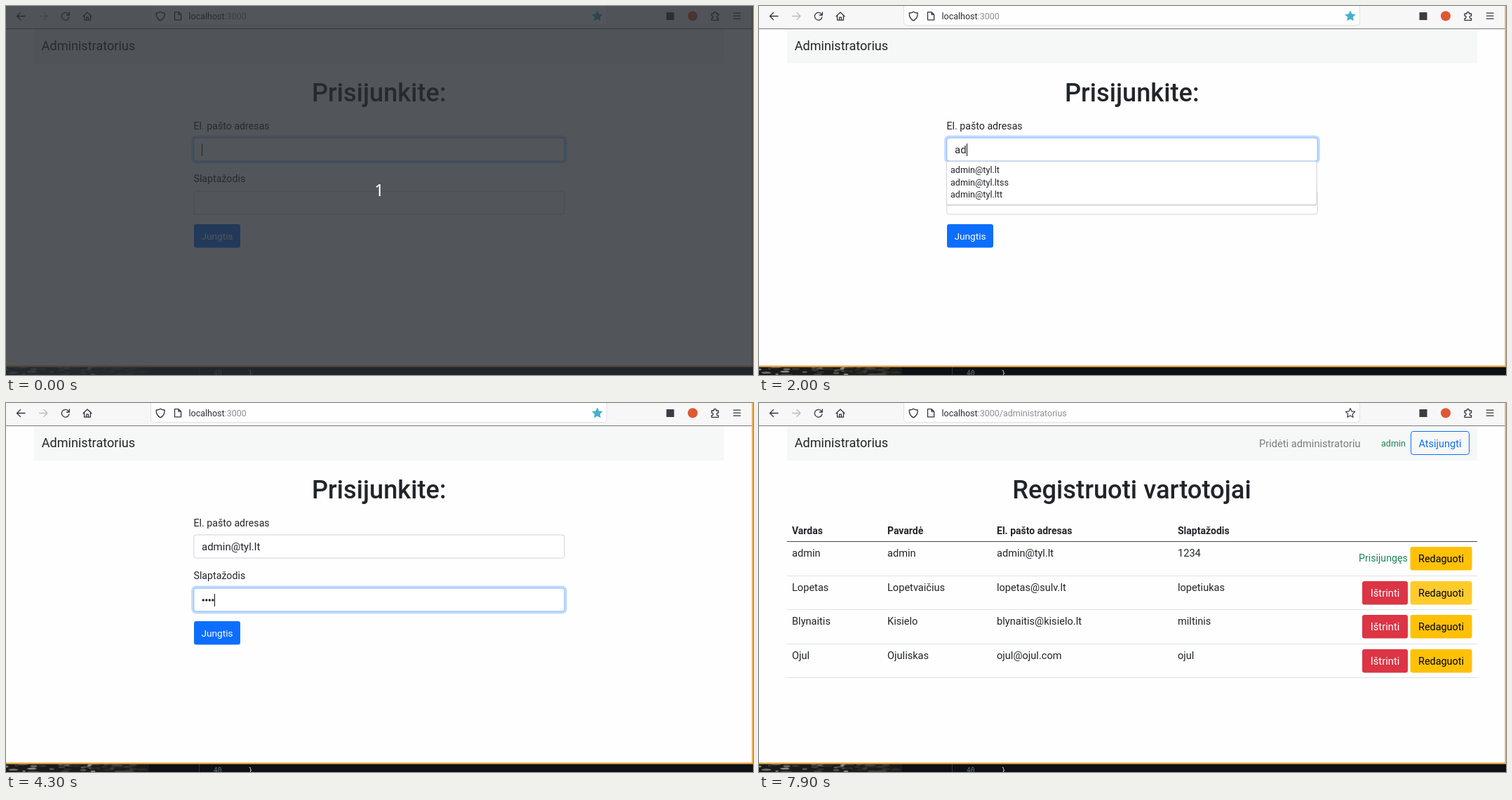
An HTML page that plays this animation: 1065 by 526 pixels, repeating every 8000 ms.

```html
<!DOCTYPE html>
<html lang="lt">
<head>
<meta charset="utf-8">
<title>Administratorius</title>
<style>
  html, body { margin: 0; width: 100%; height: 100%; overflow: hidden; background: #fefefe; }
  svg { display: block; width: 1065px; height: 526px; }
  text { font-family: Roboto, "Noto Sans", sans-serif; white-space: pre; }
  .mono { font-family: "DejaVu Sans Mono", monospace; }
  .icon { fill: none; stroke: #35343c; stroke-width: 1.3; stroke-linecap: round; stroke-linejoin: round; }
  .icon .dim { stroke: #bdbdc1; }
</style>
</head>
<body>
<svg id="stage" viewBox="0 0 1065 526" xmlns="http://www.w3.org/2000/svg"></svg>
<script>
const INK = '#212529', BLUE = '#0d6efd', GREEN = '#198754', YELLOW = '#ffc107';
const LOOP = 8000;
const mails = ['admin@tyl.lt', 'admin@tyl.ltss', 'admin@tyl.ltt',
  'lopetas@sulv.lt', 'blynaitis@kisielo.lt', 'ojul@ojul.com'];
const users = [
  ['admin', 'admin', mails[0], '1234'],
  ['Lopetas', 'Lopetvaičius', mails[3], 'lopetiukas'],
  ['Blynaitis', 'Kisielo', mails[4], 'miltinis'],
  ['Ojul', 'Ojuliskas', mails[5], 'ojul']
];
const columns = [47, 183, 339, 597];

const text = (x, y, s, size = 14.6, fill = INK, more = '') =>
  `<text x="${x}" y="${y}" font-size="${size}" fill="${fill}" ${more}>${s}</text>`;
const middle = (x, y, s, size, fill, more = '') =>
  text(x, y, s, size, fill, 'text-anchor="middle" ' + more);
const rect = (x, y, w, h, fill, more = '') =>
  `<rect x="${x}" y="${y}" width="${w}" height="${h}" fill="${fill}" ${more}/>`;
const path = (d, more = '') => `<path d="${d}" ${more}/>`;
const group = (id, body) => `<g id="${id}">${body}</g>`;
const button = (x, y, w, label, fill, color, size = 14.5, id = '') =>
  rect(x, y, w, 33.5, fill, `rx="3.3" ${id && `id="${id}"`}`) + middle(x + w / 2, y + 22, label, size, color);

function star(cx, cy, r) {
  const pts = [];
  for (let i = 0; i < 10; i++) {
    const a = Math.PI * (i / 5 - 0.5), d = i % 2 ? r * 0.48 : r;
    pts.push((cx + d * Math.cos(a)).toFixed(1) + ',' + (cy + d * Math.sin(a)).toFixed(1));
  }
  return `<polygon id="star" points="${pts.join(' ')}" stroke-width="1.2" stroke-linejoin="round"/>`;
}

function field(y, id) {
  return rect(267.8, y, 528.4, 33, '#fff', 'rx="3.3" stroke="#ced4da"') +
    group(id, rect(266, y - 1.8, 532, 36.6, 'none', 'rx="5" stroke="#c2dbfe" stroke-width="3.6"') +
      rect(267.8, y, 528.4, 33, '#fff', 'rx="3.3" stroke="#86b7fe"'));
}

function toolbar() {
  return rect(0, 0, 1065, 32, '#f7f7f7') + rect(0, 32, 1065, 1, '#7a7a7e') +
    rect(206.5, -4, 650, 31.5, '#fefefe', 'rx="4" stroke="#e2e2e4"') +
    '<g class="icon">' +
    path('M27 14.5H15.5M20.5 9.5L15.5 14.5L20.5 19.5') +
    path('M47.5 14.5H59M54 9.5L59 14.5L54 19.5', 'class="dim"') +
    group('reload', path('M89.2 11.7A5.4 5.4 0 1 0 90 15.8M90.4 9V13H86.4')) +
    group('stop', path('M80 10.5L89 19.5M89 10.5L80 19.5')) +
    path('M110 14.8L116 9L122 14.8M111.6 13.6V20.2H120.4V13.6M114.6 20V16.2H117.4V20') +
    path('M220.2 8.2C222 9.6 224 10 226.2 10C226.4 15.2 224.4 18.8 220.2 20.8C216 18.8 214 15.2 214.2 10C216.4 10 218.4 9.6 220.2 8.2Z') +
    path('M240.5 8.6H246L249.6 12.2V19.8H240.5ZM246 8.6V12.2H249.6') +
    path('M1006 11H1009V9.8A1.9 1.9 0 0 1 1012.6 9.8V11H1015.6V14.2H1014.4A1.8 1.8 0 0 0 1014.4 17.6H1015.6V20.4H1006V17.6H1007A1.8 1.8 0 0 0 1007 14.2H1006Z') +
    path('M1037.3 10.2H1047M1037.3 14.2H1047M1037.3 18.2H1047') + '</g>' +
    star(843, 14.6, 7) +
    rect(941.5, 9, 11, 11, '#3c3b43') +
    '<circle cx="979" cy="14.3" r="7" fill="#de5833"/>' +
    text(260.5, 18.6, 'localhost<tspan fill="#8d8d92">:3000<tspan id="route"></tspan></tspan>', 12.5, '#2b2a33');
}

function login() {
  return middle(531.7, 136, 'Prisijunkite:', 36.2, INK, 'font-weight="500"') +
    text(267.5, 175.5, 'El. pašto adresas', 14.2) + text(267.5, 251, 'Slaptažodis', 14.2) +
    field(188, 'mailRing') + field(264, 'passRing') +
    text(279, 210, '', 15, INK, 'id="mail"') +
    group('dots', [0, 1, 2, 3].map(i => `<circle cx="${281.2 + i * 4.55}" cy="281" r="1.75" fill="${INK}"/>`).join('')) +
    rect(0, 0, 1, 18, '#111', 'id="caret"') +
    button(268, 311, 66, 'Jungtis', BLUE, '#fff', 13.7, 'enter') +
    group('list',
      rect(267.5, 222.5, 528, 62, '#000', 'id="listShade" rx="3" opacity=".12"') +
      rect(267.5, 221.5, 527.5, 61, '#fff', 'id="listBox" rx="2" stroke="#d4d4d6"') +
      rect(269, 225, 525, 18, '#f0f0f0', 'id="pick"') +
      mails.map((m, i) => text(273, 238 + i * 17.7, m, 12.6, INK, 'class="row"')).join(''));
}

function admin() {
  const heads = ['Vardas', 'Pavardė', 'El. pašto adresas', 'Slaptažodis'];
  let out = text(713, 62.8, 'Pridėti administratoriu', 14.65, '#7a7c7c') +
    text(887, 62, 'admin', 12.6, GREEN) +
    rect(929.5, 40.5, 83, 33, 'none', `rx="3.3" stroke="${BLUE}"`) +
    middle(971, 62.8, 'Atsijungti', 14.5, BLUE) +
    middle(531.5, 136, 'Registruoti vartotojai', 36.3, INK, 'font-weight="500"') +
    heads.map((h, i) => text(columns[i], 187, h, 14, INK, 'font-weight="700"')).join('') +
    rect(40, 197, 984, 1, '#44484b');
  users.forEach((u, r) => {
    const y = 197.5 + r * 48.5, top = Math.floor(y + 8);
    out += u.map((s, i) => text(columns[i], y + 21.5, s)).join('') +
      rect(40, Math.floor(y + 48.5), 984, 1, '#dee2e6') +
      button(928.5, top, 88, 'Redaguoti', YELLOW, '#000', 14.4, 'edit' + r) +
      (r ? button(860, top, 65, 'Ištrinti', '#dc3545', '#fff', 14.8)
         : text(855, y + 28.5, 'Prisijungęs', 14.2, GREEN));
  });
  return out;
}

// Rubble: small seeded slabs, brighter towards the left.
function rubble() {
  let seed = 7, out = '';
  const rnd = () => (seed = seed * 16807 % 2147483647) / 2147483647;
  for (let i = 0; i < 60; i++) {
    const x = rnd() * 196, v = Math.round(30 + rnd() * (x < 125 ? 110 : 35));
    out += `<ellipse cx="${x.toFixed(1)}" cy="${(515 + rnd() * 11).toFixed(1)}" rx="${(2 + rnd() * 7).toFixed(1)}" ry="1.4" fill="rgb(${v},${v},${v - 4})"/>`;
  }
  return out;
}

function desktop() {
  return rect(0, 514, 1065, 12, '#0d1015') + rect(0, 514, 204, 12, '#1b1b1a') + rubble() +
    rect(275, 515, 1, 11, '#30363d') +
    text(296, 527, '40', 9.6, '#6e7681', 'class="mono"') + text(345.5, 527, '}', 10, '#c9d1d9', 'class="mono"') +
    rect(0, 512.5, 1065, 2.3, '#e9a646') + rect(1063.3, 0, 1.7, 514, '#f0ad4e');
}

const stage = document.getElementById('stage');
stage.innerHTML = rect(0, 0, 1065, 526, '#fefefe') + rect(40, 33, 984, 49, '#f6f8f7') + toolbar() +
  text(50.7, 63.3, 'Administratorius', 18.1) + group('login', login()) + group('admin', admin()) + desktop() +
  group('veil', rect(0, 0, 1065, 526, '#272c33', 'opacity=".8"') +
    middle(532, 271, '1', 24, '#fff', 'style="font-family:\'Noto Sans\',sans-serif"'));

const el = {};
stage.querySelectorAll('[id]').forEach(n => el[n.id] = n);
const rows = [...stage.querySelectorAll('.row')];
const dots = [...el.dots.children];
const set = (n, attrs) => { for (const k in attrs) n.setAttribute(k, attrs[k]); };
const show = (n, on) => set(n, { opacity: +on });

// Each track is a list of [start ms, value] steps.
const at = (track, t) => track.reduce((v, s) => t >= s[0] ? s[1] : v, track[0][1]);
const tracks = {
  mail: [[0, ''], [800, 'a'], [2000, 'ad'], [2500, mails[0]]],
  rows: [[0, 0], [500, 6], [900, 3], [2500, 0]],
  pick: [[0, 'none'], [2100, '#f0f0f1'], [2300, '#e4e4e6']],
  focus: [[0, 0], [3000, 0.5], [3100, 1]],
  dots: [[0, 0], [3500, 1], [3600, 2], [3800, 3], [4100, 4]],
  enter: [[0, BLUE], [4400, '#0c66ea'], [4500, '#0b5ed7']],
  reload: [[0, 1], [4800, 0], [5500, 0.15], [5600, 0.3], [5700, 0.4], [5900, 0.7], [6000, 1]],
  stop: [[0, 0], [4800, 1], [5500, 0.5], [5600, 0.2], [5700, 0]],
  edit: [[0, YELLOW], [7800, '#ffc61a'], [7900, '#ffca2c']]
};

function render(t) {
  const s = {};
  for (const k in tracks) s[k] = at(tracks[k], t);
  const signedIn = t >= 4900;
  show(el.veil, t < 100);
  show(el.login, !signedIn);
  show(el.admin, signedIn);
  show(el.reload, s.reload);
  show(el.stop, s.stop);
  set(el.star, signedIn ? { fill: 'none', stroke: '#35343c' } : { fill: '#45b1c9', stroke: '#45b1c9' });
  el.route.textContent = signedIn ? '/administratorius' : '';

  el.mail.textContent = s.mail;
  show(el.mailRing, 1 - s.focus);
  show(el.passRing, s.focus);
  dots.forEach((d, i) => show(d, i < s.dots));
  const inPass = s.focus > 0;
  set(el.caret, {
    x: Math.round(279 + (inPass ? s.dots * 4.55 : s.mail ? el.mail.getComputedTextLength() : 0)),
    y: inPass ? 272 : 196
  });
  show(el.caret, t < 500 || t >= 800);

  show(el.list, s.rows > 0);
  const height = 8.5 + s.rows * 17.7;
  set(el.listBox, { height });
  set(el.listShade, { height: height + 1 });
  rows.forEach((r, i) => show(r, i < s.rows));
  set(el.pick, { fill: s.pick });
  set(el.enter, { fill: s.enter });
  set(el.edit1, { fill: s.edit });
}

const start = performance.now();
function tick() {
  render((performance.now() - start) % LOOP);
  requestAnimationFrame(tick);
}
tick();
</script>
</body>
</html>
```
